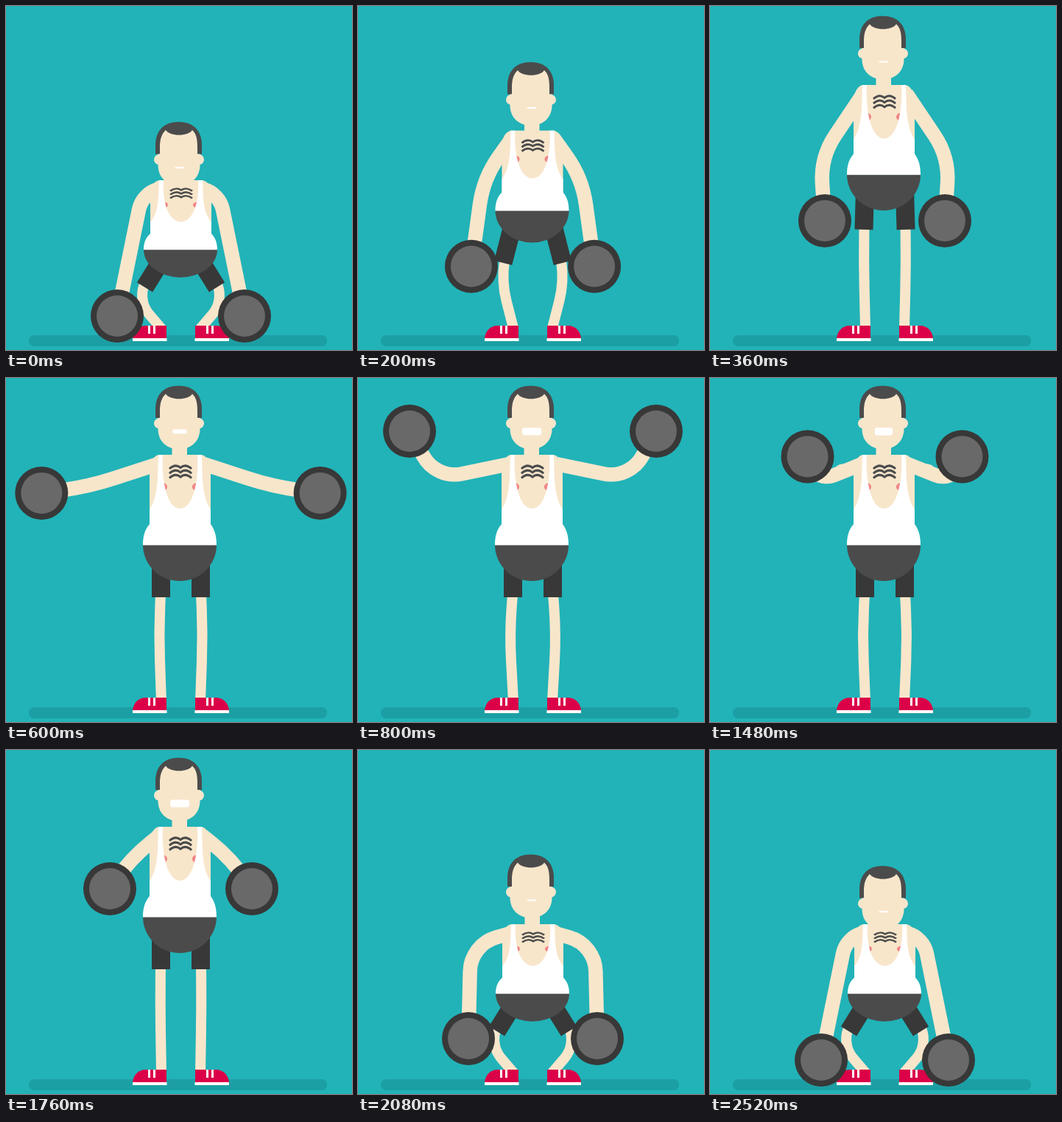
An HTML page with a canvas that plays this animation: 470 px wide and 466 px high, repeating every 2560 ms.

```html
<!DOCTYPE html>
<html lang="en">
<head>
<meta charset="utf-8">
<title>Weightlifter</title>
<style>
  html, body { margin: 0; width: 100%; height: 100%; overflow: hidden; background: #21b3b8; }
  canvas { display: block; }
</style>
</head>
<body>
<canvas id="stage" width="470" height="466"></canvas>
<script>
const ctx = document.getElementById('stage').getContext('2d');
const LOOP = 2560, STEP = 40, SQUAT = 132;
const BG = '#21b3b8', SKIN = '#f8e6cb', DARK = '#4b4b4b', BLACK = '#383838', RED = '#db0048';

// Left arm key poses, measured from the standing body
const SHOULDER = [208, 116];
const rest = { elbow: [185, 122], weight: [151, 288] };
const poses = [
  { at: 0, ...rest },
  { at: 360, elbow: [150, 202], weight: [156, 288] },
  { at: 640, elbow: [110, 142], weight: [42, 134] },
  { at: 800, elbow: [106, 137], weight: [70, 72] },
  { at: 1000, elbow: [103, 140], weight: [100, 42] },
  { at: 1200, elbow: [102, 141], weight: [121, 49] },
  { at: 1760, elbow: [168, 148], weight: [141, 188] },
  { at: 2080, elbow: [153, 132], weight: [150, 259] },
  { at: 2400, ...rest }
];

const face = new Path2D('M209 45C209 35 211 27 217 21.5C222 30.5 248 30.5 253 21.5C259 27 260 35 260 45V54H263.5' +
  'V69C263.5 86 251 96.5 235 96.5S206.5 86 206.5 69V54H209Z');
const hair = new Path2D('M203 54V42C203 22 215 10.5 234.5 10.5S266 22 266 42V54Z');
const chest = new Path2D('M207 104H266Q278 108 278 130V200H195V130Q195 108 207 104Z');
const shirt = new Path2D('M207 104H213C211 140 219 177 236.5 177S262 140 260 104H266C267 135 266 160 278 178' +
  'V198C284 206 286 215 286 226.5H186C186 215 188 206 195 198V178C207 160 206 135 207 104Z');
const wave = new Path2D('M222 123Q230 115.5 237 121.5Q244 115.5 252 123');
const shoe = new Path2D('M172 450C173 440 180 433 190 433H218V450Z');

function ease(t, from, to) {
  const u = Math.min(1, Math.max(0, (t - from) / (to - from)));
  return u * u * (3 - 2 * u);
}

// Eases from 0 to 1 over a..b and back over c..d
const pulse = (t, a, b, c, d) => ease(t, a, b) - ease(t, c, d);

// Monotone cubic through the poses, for one joint
function joint(name, t) {
  const last = poses.length - 1;
  if (t >= poses[last].at) return poses[last][name];
  const i = poses.findIndex(p => p.at > t) - 1;
  const span = poses[i + 1].at - poses[i].at, u = (t - poses[i].at) / span;
  return [0, 1].map(axis => {
    const value = k => poses[k][name][axis];
    const slope = k => (value(k + 1) - value(k)) / (poses[k + 1].at - poses[k].at);
    const tangent = k => {
      if (k === 0 || k === last) return 0;
      const a = slope(k - 1), b = slope(k);
      return a * b > 0 ? 2 * a * b / (a + b) : 0;
    };
    return value(i) + (value(i + 1) - value(i)) * ease(u, 0, 1) +
      span * u * (1 - u) * ((1 - u) * tangent(i) - u * tangent(i + 1));
  });
}

function fill(color, path) {
  ctx.fillStyle = color;
  ctx.fill(path);
}

function rect(color, x, y, w, h, r = 0) {
  ctx.fillStyle = color;
  ctx.beginPath();
  ctx.roundRect(x, y, w, h, r);
  ctx.fill();
}

function disc(color, x, y, rx, ry = rx, end = Math.PI * 2) {
  ctx.fillStyle = color;
  ctx.beginPath();
  ctx.ellipse(x, y, rx, ry, 0, 0, end);
  ctx.fill();
}

// Two straight bones joined by a soft bend
function limb(width, a, b, c) {
  const angle = p => Math.atan2(p[1] - b[1], p[0] - b[0]);
  const length = p => Math.hypot(p[0] - b[0], p[1] - b[1]);
  const inner = Math.acos(Math.cos(angle(a) - angle(c)));
  const bend = Math.min(36, 0.95 * length(a), 0.95 * length(c));
  ctx.strokeStyle = SKIN;
  ctx.lineWidth = width;
  ctx.beginPath();
  ctx.moveTo(...a);
  ctx.arcTo(...b, ...c, bend * Math.tan(inner / 2));
  ctx.lineTo(...c);
  ctx.stroke();
}

function bothSides(draw) {
  draw();
  ctx.save();
  ctx.translate(475, 0);
  ctx.scale(-1, 1);
  draw();
  ctx.restore();
}

function drawLeg(squat, brace) {
  const bend = squat ** 0.7;
  const hem = [210.5 - 22 * bend, 297 + 84 * bend];
  limb(14, [210 - 22 * squat, hem[1] - 4], [209.5 - 3.5 * brace - 30 * squat, 347 + 53 * squat], [211 + squat, 438]);
  fill(RED, shoe);
  rect('#fff', 172, 450, 46.5, 4);
  for (const x of [193, 200]) rect('#fff', x, 433, 3, 11);
  ctx.strokeStyle = BLACK;
  ctx.lineWidth = 25;
  ctx.beginPath();
  ctx.moveTo(210.5 + squat, 245 + 99 * squat);
  ctx.lineTo(...hem);
  ctx.stroke();
}

function drawArm(elbow, weight, flex) {
  limb(19.5, SHOULDER, elbow, weight);
  if (flex > 0) {
    const [x, y] = SHOULDER.map((s, i) => s + (elbow[i] - s) * 0.39);
    disc(SKIN, x, y - 5 * flex, 6 + 11 * flex, 6 + 9 * flex);
  }
}

function drawTorso(squat) {
  ctx.save();
  ctx.translate(squat, 104);
  ctx.scale(1, 1 - 0.23 * squat);
  ctx.translate(0, -104);
  disc(DARK, 236, 226, 50, 49, Math.PI);
  fill(SKIN, chest);
  for (const x of [214, 258]) disc('#f08585', x, 147.5, 5);
  fill('#fff', shirt);
  ctx.strokeStyle = DARK;
  ctx.lineWidth = 3;
  for (let i = 0; i < 3; i++) {
    ctx.stroke(wave);
    ctx.translate(0, 6.3);
  }
  ctx.restore();
}

function drawHead(open, flex) {
  const w = 13 + 13 * open - 5 * flex, h = 2 + 8 * open + 2 * flex;
  fill(DARK, hair);
  for (const x of [208, 262]) disc(SKIN, x, 61.5, 7);
  fill(SKIN, face);
  rect('#fff', 236 - w / 2, 72.5 - h / 2, w, h, Math.min(3, h / 2));
}

function draw(t) {
  const squat = 1 - pulse(t, 0, 395, 1780, 2070);
  const droop = 1 - pulse(t, 0, 240, 2080, 2480);
  const brace = pulse(t, 440, 760, 1300, 1760);
  const flex = pulse(t, 800, 1160, 1300, 1600);
  const open = pulse(t, 440, 760, 1800, 2040);
  const elbow = joint('elbow', t), weight = joint('weight', t);

  rect(BG, 0, 0, 470, 466);
  rect('#1c9fa4', 31, 446, 405, 15, 7);
  bothSides(() => drawLeg(squat, brace));

  ctx.save();
  ctx.translate(0, SQUAT * squat);
  bothSides(() => drawArm(elbow, weight, flex));
  rect(SKIN, 225.5 + squat, 85, 20.5, 25);
  drawTorso(squat);
  ctx.save();
  ctx.translate(0, 15.5 * droop - squat);
  drawHead(open, flex);
  ctx.restore();
  bothSides(() => {
    disc(BLACK, ...weight, 36);
    disc('#696969', ...weight, 28);
  });
  ctx.restore();
}

const start = performance.now();
function tick() {
  const t = (performance.now() - start) % LOOP;
  draw(Math.floor(t / STEP) * STEP);
  requestAnimationFrame(tick);
}
tick();
</script>
</body>
</html>
```
